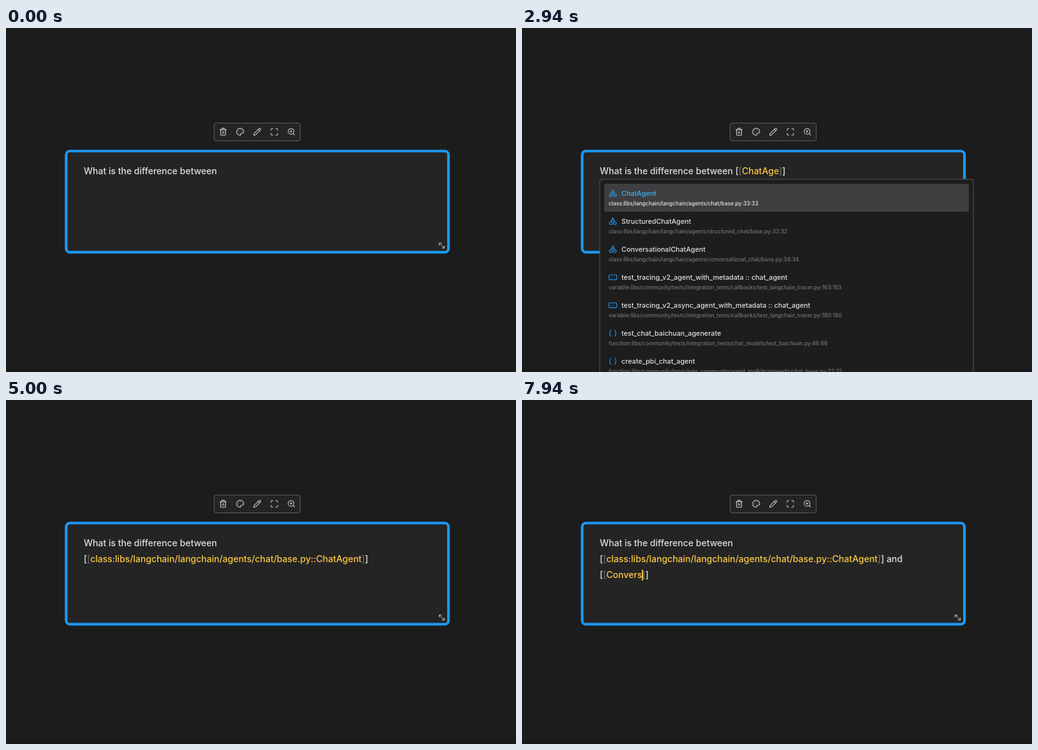
Animation of 800x541 px, one loop 8000 ms. Source, as an HTML page:

```html
<!DOCTYPE html>
<html lang="en">
<head>
<meta charset="utf-8">
<title>Mention picker</title>
<style>
  html, body { margin: 0; width: 100%; height: 100%; overflow: hidden; background: #1c1c1c; }
  svg, #editor { position: absolute; left: 0; top: 0; }
  svg { font-family: Inter, "Open Sans", sans-serif; font-weight: 500; }
  .line { fill: none; stroke-linecap: round; stroke-linejoin: round; }
  #editor { left: 122px; top: 212px; font: 500 14px/25px Inter, "Open Sans", sans-serif; color: #dedede; white-space: pre; }
  #editor div { height: 25px; }
  #editor b { font-weight: 500; color: #fbc940; }
  #editor i { font-style: normal; color: #696969; }
  #editor u { display: inline-block; width: 1.4px; height: 17px; margin-right: -1.4px; vertical-align: -4px; background: currentColor; }
  #editor.blink u { visibility: hidden; }
  .title { font-size: 10.75px; fill: #e0e0e0; }
  .path { font-size: 8.45px; fill: #757575; }
  .row rect.back { fill: none; }
  .row.on rect.back { fill: #3e3e40; }
  .row.on .title { fill: #36a3f0; }
  .row:first-child .title { fill: #4aaef2; }
  .row.on .path { fill: #e6e6e6; }
</style>
</head>
<body>
<svg width="800" height="541">
  <rect y="538" width="800" height="3" fill="#181818"/>
  <rect x="94.4" y="193.5" width="599.7" height="159.2" rx="6" fill="#242425" stroke="#1c98f3" stroke-width="4.2"/>
  <rect x="326.5" y="149.5" width="135" height="28" rx="3.5" fill="#242424" stroke="#5c5c5c"/>
  <g id="tools" class="line" stroke="#d0d0d0" stroke-width="1.9"></g>
  <path class="line" stroke="#d0d0d0" d="M679.7 338.2l7.8 7.8M679.7 341.4v-3.2h3.2M687.5 342.8v3.2h-3.2"/>
</svg>
<div id="editor"></div>
<svg id="menu" width="800" height="541">
  <rect x="122" y="237.8" width="586" height="320" rx="4" fill="#1d1d1d" stroke="#565656"/>
  <g id="rows"></g>
</svg>
<script>
const $ = id => document.getElementById(id);
const LOOP = 8000, MENU_OPEN = 2350, MENU_CLOSE = 4450;

const dot = (x, y) => `M${x} ${y}h.01`;
const tools = [
  'M3 6h18M19 6v14a2 2 0 0 1-2 2H7a2 2 0 0 1-2-2V6M8 6V4a2 2 0 0 1 2-2h4a2 2 0 0 1 2 2v2M10 11v6M14 11v6',
  'M12 2C6.5 2 2 6.5 2 12s4.5 10 10 10c2 0 2-2 1.2-2.8-1-1.2-.2-2.8 1.2-2.8h2c3 0 5.6-2.5 5.6-5.5C22 6 17.5 2 12 2z' +
    dot(13.5, 6.5) + dot(17.5, 10.5) + dot(8.5, 7.5) + dot(6.5, 12.5),
  'M17 3a2.8 2.8 0 1 1 4 4L7.5 20.5 2 22l1.5-5.5zM15 5l4 4',
  'M8 3H5a2 2 0 0 0-2 2v3M21 8V5a2 2 0 0 0-2-2h-3M3 16v3a2 2 0 0 0 2 2h3M16 21h3a2 2 0 0 0 2-2v-3',
  'M3 11a8 8 0 1 0 16 0a8 8 0 1 0-16 0M21 21l-4.3-4.3M11 8v6M8 11h6'
];
$('tools').innerHTML = tools.map((d, i) =>
  `<path d="${d}" transform="translate(${333.8 + i * 26.8} 156.5) scale(.56)"/>`).join('');

// Icons are centred on the origin.
const icons = {
  class: 'M0-5.4L2.6-.9H-2.6zM-5.4 3a2.2 2.2 0 1 0 4.4 0a2.2 2.2 0 1 0-4.4 0M1 3a2.2 2.2 0 1 0 4.4 0a2.2 2.2 0 1 0-4.4 0',
  variable: 'M-5-3.8H5a1 1 0 0 1 1 1V2.8a1 1 0 0 1-1 1H-5a1 1 0 0 1-1-1V-2.8a1 1 0 0 1 1-1z' +
    dot(-2.8, 0) + dot(0, 0) + dot(2.8, 0),
  function: 'M-3-5Q-6.6 0-3 5M3-5Q6.6 0 3 5'
};
const items = [
  ['ChatAgent', 'class:libs/langchain/langchain/agents/chat/base.py:33:33'],
  ['StructuredChatAgent', 'class:libs/langchain/langchain/agents/structured_chat/base.py:32:32'],
  ['ConversationalChatAgent', 'class:libs/langchain/langchain/agents/conversational_chat/base.py:34:34'],
  ['test_tracing_v2_agent_with_metadata :: chat_agent', 'variable:libs/community/tests/integration_tests/callbacks/test_langchain_tracer.py:163:163'],
  ['test_tracing_v2_async_agent_with_metadata :: chat_agent', 'variable:libs/community/tests/integration_tests/callbacks/test_langchain_tracer.py:180:180'],
  ['test_chat_baichuan_agenerate', 'function:libs/community/tests/integration_tests/chat_models/test_baichuan.py:66:66'],
  ['create_pbi_chat_agent', 'function:libs/community/langchain_community/agent_toolkits/powerbi/chat_base.py:22:22']
];
$('rows').innerHTML = items.map(([title, path], i) => `
  <g class="row" transform="translate(0 ${245 + i * 44})">
    <rect class="back" x="129" width="572" height="44" rx="3"/>
    <path class="line" stroke="#2196ee" stroke-width="1.15" transform="translate(142.5 15)" d="${icons[path.split(':')[0]]}"/>
    <text class="title" x="156" y="18.8">${title}</text>
    <text class="path" x="136" y="33.8">${path}</text>
  </g>`).join('');

const caret = '<u></u>';
const link = (text, mark = '') => `[<i>[</i><b>${text}${mark}</b><i>]</i>]`;
const lines = (...list) => list.map(s => `<div>${s}</div>`).join('');
const question = 'What is the difference between ';
const chosen = link('class:libs/langchain/langchain/agents/chat/base.py::ChatAgent');

// Each step is [time of the key press, editor content].
const steps = [[-600, lines(question + caret)]];
function typeLink(start, gap, word, show) {
  steps.push([start, show(`[${caret}]`)]);
  for (let n = 0; n <= word.length; n++)
    steps.push([start + (n + 1) * gap, show(link(word.slice(0, n), caret))]);
}
typeLink(1000, 145, 'ChatAge', s => lines(question + s));
steps.push([MENU_CLOSE, lines(question, chosen + caret)]);
[...' and '].forEach((_, n) =>
  steps.push([5160 + n * 160, lines(question, chosen + ' and '.slice(0, n + 1) + caret)]));
typeLink(6400, 157, 'Convers', s => lines(question, chosen + ' and ', s));

const rows = [...$('rows').children];
let shown;
function draw(now) {
  const t = now % LOOP;
  const step = steps.findLast(s => s[0] <= t);
  if (step !== shown) $('editor').innerHTML = (shown = step)[1];
  $('editor').className = Math.floor((t - step[0]) / 500) % 2 ? 'blink' : '';
  $('menu').style.display = t >= MENU_OPEN && t < MENU_CLOSE ? '' : 'none';
  const picked = t >= 3700 && t < 4100 ? 1 : 0;
  rows.forEach((row, i) => row.classList.toggle('on', i === picked));
  requestAnimationFrame(() => draw(performance.now()));
}
draw(performance.now());
</script>
</body>
</html>
```
